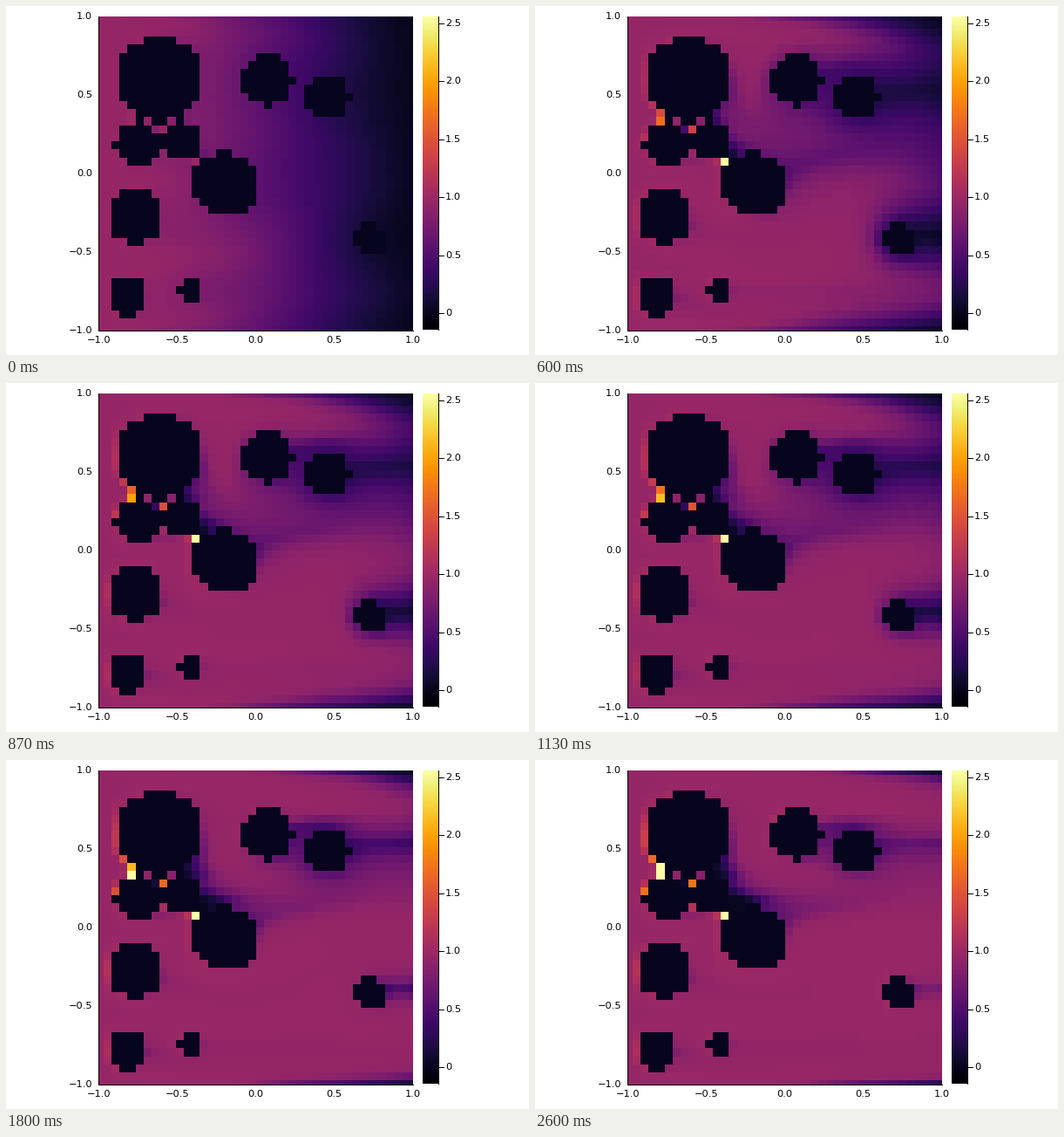
Recreate the animation shown at these times as a matplotlib script. Size 600 by 400 pixels, loop 2.67 s.

```python
import numpy as np
import matplotlib.pyplot as plt
from matplotlib.animation import FuncAnimation
from matplotlib.lines import Line2D

W, H = 600, 400
LEFT, RIGHT, TOP, BOTTOM = 107, 466.5, 12, 372
VMIN, VMAX = -0.147, 2.56
N = 40
TICKS = 40
LOOP = 2670
INLET = 0.95
SPEED = 16  # mean inflow, cells per second

# Obstacles: column, row, radius in cells.
CIRCLES = [
    (7.5, 7.8, 5.35), (4.8, 15.8, 2.82), (10.2, 15.4, 2.5),
    (4.6, 24.9, 3.35), (15.58, 20.85, 4.05), (20.87, 7.8, 3.22),
    (28.4, 10.1, 2.75), (33.6, 27.6, 2.1), (3.54, 34.9, 2.45),
    (11.3, 34, 1.35),
]

col, row = np.meshgrid(np.arange(N), np.arange(N))
gap = np.minimum(row, N - 1 - row) + 0.5
for cx, cy, rad in CIRCLES:
    gap = np.minimum(gap, np.hypot(col - cx, row - cy) - rad)
solid = gap <= 0
fluid = ~solid
front = fluid[:, :-1] & solid[:, 1:]


def harmonic(a, b):
    return 2 * a * b / (a + b)


def flow(leak):
    """Pressure-driven flow, slower near walls; obstacles let a little through."""
    k = np.where(solid, leak, np.clip(gap, 0.4, 5) / 5)
    kx = harmonic(k[:, :-1], k[:, 1:])
    ky = harmonic(k[:-1], k[1:])
    inlet, outlet = 2 * k[:, 0], 2 * k[:, -1]

    cell = np.arange(N * N).reshape(N, N)
    matrix = np.zeros((N * N, N * N))
    rhs = np.zeros(N * N)
    for a, b, g in ((cell[:, :-1], cell[:, 1:], kx), (cell[:-1], cell[1:], ky)):
        matrix[a, a] += g
        matrix[b, b] += g
        matrix[a, b] -= g
        matrix[b, a] -= g
    matrix[cell[:, 0], cell[:, 0]] += inlet
    matrix[cell[:, -1], cell[:, -1]] += outlet
    rhs[cell[:, 0]] = inlet
    p = np.linalg.solve(matrix, rhs).reshape(N, N)

    u = np.zeros((N, N + 1))
    v = np.zeros((N + 1, N))
    u[:, 0] = inlet * (1 - p[:, 0])
    u[:, -1] = outlet * p[:, -1]
    u[:, 1:-1] = kx * (p[:, :-1] - p[:, 1:])
    v[1:-1] = ky * (p[:-1] - p[1:])
    scale = SPEED / u[:, 0].mean()

    # Nothing dissolved crosses an obstacle: it piles up in front, thins behind.
    u[:, 1:-1] *= fluid[:, :-1] & fluid[:, 1:]
    v[1:-1] *= fluid[:-1] & fluid[1:]
    return u * scale, v * scale


def simulate(leak):
    u, v = flow(leak)
    right, left = np.maximum(u, 0), np.minimum(u, 0)
    down, up = np.maximum(v, 0), np.minimum(v, 0)
    outflow = (right[:, 1:] - left[:, :-1] + down[1:] - up[:-1]).max()
    tick = LOOP / TICKS / 1000
    steps = int(np.ceil(tick * outflow / 0.8))
    dt = tick / steps

    c = INLET * (1 - (col / (N - 1)) ** 2) ** 1.7 * fluid
    states = []
    for _ in range(TICKS):
        for _ in range(steps):
            pad = np.pad(c, 1, mode="edge")
            pad[:, 0] = INLET
            fx = right * pad[1:-1, :-1] + left * pad[1:-1, 1:]
            fy = down * pad[:-1, 1:-1] + up * pad[1:, 1:-1]
            c = c + dt * (fx[:, :-1] - fx[:, 1:] + fy[:-1] - fy[1:])
        states.append(c)
    return states


def calibrate(goal=1.4, low=-4.0, high=-0.5):
    """Find the leak that gives the wanted build-up in front of obstacles."""
    for _ in range(7):
        mid = (low + high) / 2
        last = simulate(10 ** mid)[-1]
        if np.percentile(last[:, :-1][front], 90) > goal:
            high = mid
        else:
            low = mid
    return 10 ** low


states = simulate(calibrate())

fig = plt.figure(figsize=(W / 100, H / 100), dpi=100, facecolor="white")


def panel(x0, y0, x1, y1):
    ax = fig.add_axes([x0 / W, 1 - y1 / H, (x1 - x0) / W, (y1 - y0) / H])
    ax.axis("off")
    return ax


def label(x, y, value, align):
    text = value.replace("-", "\u2212")
    fig.text(x / W, 1 - y / H, text, ha=align, va="center",
             family="DejaVu Sans", size=8.2, color="black")


def stroke(x0, y0, x1, y1):
    fig.add_artist(Line2D([x0 / W, x1 / W], [1 - y0 / H, 1 - y1 / H],
                          color="black", lw=0.72))


ax = panel(LEFT, TOP, RIGHT, BOTTOM)
heat = ax.imshow(states[0], cmap="inferno", vmin=VMIN, vmax=VMAX,
                 interpolation="nearest", aspect="auto")
ax.set_xlim(0, N - 1)
ax.set_ylim(N - 1, 0)
stroke(106, TOP, 106, BOTTOM)
stroke(106, BOTTOM, RIGHT, BOTTOM)

bar = panel(478, TOP, 496, 371)
bar.imshow(np.linspace(1, 0, 256)[:, None], cmap="inferno", aspect="auto")
stroke(496, TOP, 496, 371)

for k in range(5):
    name = f"{-1 + k / 2:.1f}"
    label(LEFT + k * (RIGHT - LEFT) / 4, 383.5, name, "center")
    label(99, BOTTOM - k * (BOTTOM - TOP) / 4, name, "right")
for k in range(6):
    y = 352 - 66.4 * k
    stroke(496, y, 501.5, y)
    label(504, y, f"{k / 2:.1f}" if k else "0", "left")


def update(tick):
    # Later on the picture only changes every second tick.
    shown = tick if tick < 9 else tick - (tick + 1) % 2
    heat.set_data(states[shown])
    return [heat]


anim = FuncAnimation(fig, update, frames=TICKS, interval=LOOP / TICKS,
                     repeat=True, repeat_delay=0, blit=False)
plt.show()
```
